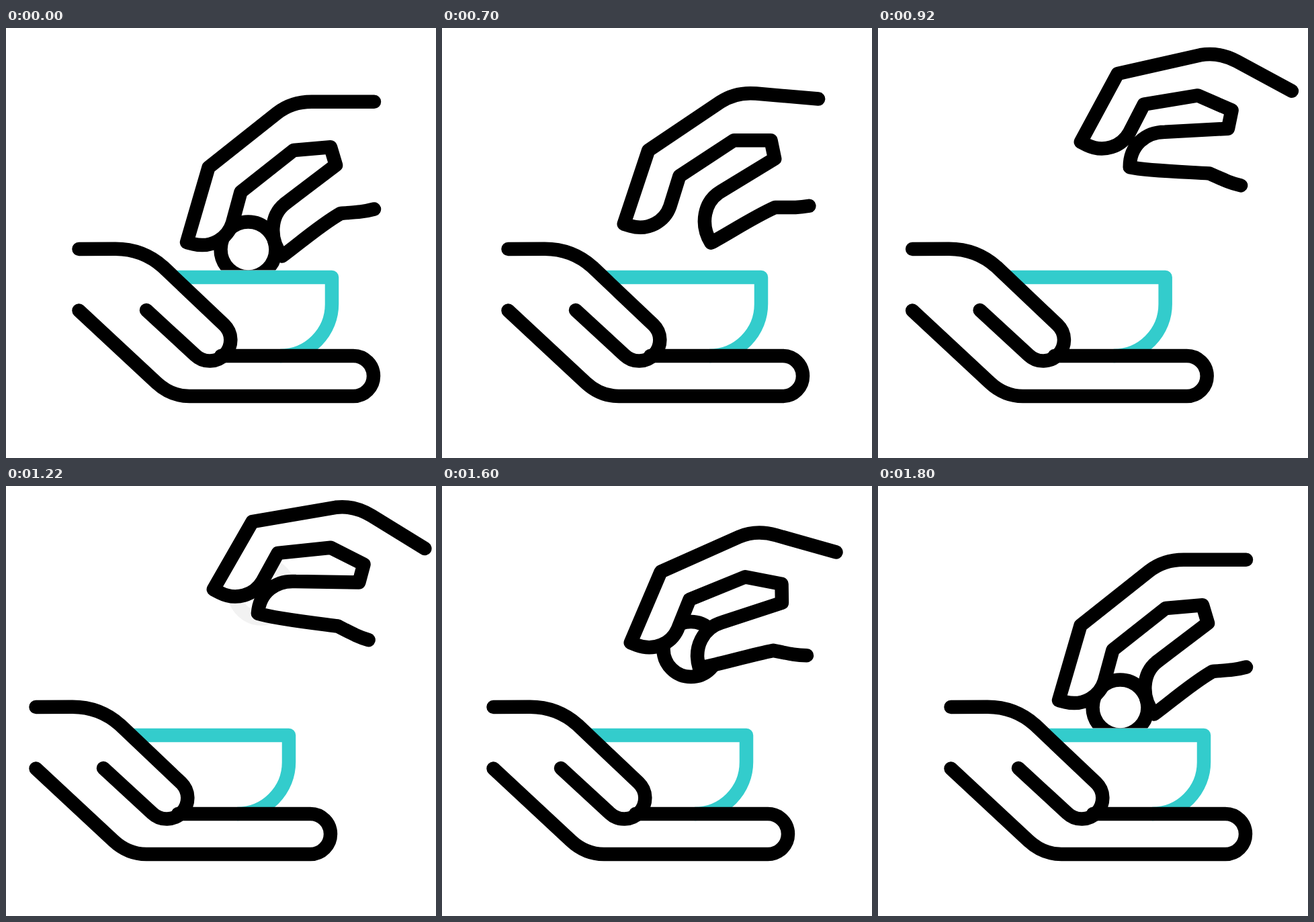
These frames come from a looping animation (640 by 640 pixels, 2020 ms). An HTML page:

```html
<!DOCTYPE html>
<html lang="en">
<head>
<meta charset="utf-8">
<title>Giving hands</title>
<style>
  html, body { margin: 0; width: 100%; height: 100%; overflow: hidden; background: #fff; }
  svg { display: block; width: 100%; height: 100%; }
  .line { fill: none; stroke: #000; stroke-width: 20.5; stroke-linecap: round; stroke-linejoin: round; }
  #bowl { stroke: #3cc; stroke-linecap: butt; }
  #giver { fill: #fff; }
</style>
</head>
<body>
<svg viewBox="0 0 640 640">
  <clipPath id="aboveBowl"><rect width="640" height="360.5"/></clipPath>
  <g clip-path="url(#aboveBowl)">
    <circle id="coin" class="line" cx="360.5" cy="329.5" r="41"/>
  </g>
  <path id="giver" class="line"/>
  <g id="receiver">
    <path id="bowl" class="line" d="M250 371H485V411A77 77 0 0 1 408 488"/>
    <path class="line" d="M108.5 420.5L224 528C238 541 254 548 273 548H517A30 30 0 0 0 517 488H320"/>
    <path class="line" d="M108.5 329L163 328.7C190 328.7 214 338 233.5 355.3L324.6 441.8A30 30 0 0 1 281.7 487L209 420"/>
  </g>
</svg>
<script>
const LOOP = 2020, STEP = 20;
const byId = id => document.getElementById(id);
const coin = byId('coin'), giver = byId('giver'), receiver = byId('receiver');

const clamp = v => Math.min(1, Math.max(0, v));
const ramp = (t, start, length = 400) => clamp((t - start) / length);
const ease = v => v * v * (3 - 2 * v);

// Moves a point along the chord of its turn around a pivot.
function bend(x, y, pivotX, pivotY, degrees, amount) {
  const angle = degrees * Math.PI / 180;
  const dx = x - pivotX, dy = y - pivotY;
  const turnedX = dx * Math.cos(angle) - dy * Math.sin(angle);
  const turnedY = dx * Math.sin(angle) + dy * Math.cos(angle);
  return `${x + (turnedX - dx) * amount} ${y + (turnedY - dy) * amount} `;
}

// The wrist and palm are rigid; the finger straightens and the thumb closes.
function handPath(lift) {
  const finger = (x, y) => bend(x, y, 313.5, 187, -18, lift);
  const thumb = (x, y, degrees) => bend(x, y, 491, 204, degrees, lift);
  return 'M548 109.7H455C436 109.7 418 115 403 127' +
    'L' + finger(301.5, 207.5) + finger(269, 319) + finger(279, 321.5) +
    'C' + finger(306, 328) + finger(330, 313) + finger(337, 290) +
    'L' + finger(349.5, 244) + '428 182L483 177.3L491 204' +
    'L' + thumb(416, 261, 6.5) +
    'C' + thumb(393, 278.5, 7.2) + thumb(391, 314, 10.8) + thumb(411, 339.5, 10.8) +
    'C' + thumb(430, 326, 8.5) + thumb(468, 293, 3) + '498 276' +
    'C525 274 533 273.5 548 269.5';
}

function draw(t) {
  const lift = ease(ramp(t, 600)) - ease(ramp(t, 1400));

  receiver.setAttribute('transform', `translate(${-64 * lift} 0)`);
  giver.setAttribute('d', handPath(lift));
  giver.setAttribute('transform',
    `translate(${33.5 * lift} ${-28.5 * lift}) rotate(${31.6 * lift} 548 189.5)`);

  // The coin drops into the bowl, then a new one fades in between the fingers.
  const refilled = t >= 1200;
  const x = refilled ? 20 * lift : 0;
  const y = refilled ? -173 * lift : 151 * ease(ramp(t, 200, 600));
  coin.setAttribute('transform', `translate(${x} ${y})`);
  coin.setAttribute('opacity', refilled ? ramp(t, 1200) : 1);
}

const origin = performance.now();
function tick() {
  const t = (performance.now() - origin) % LOOP;
  draw(Math.floor(t / STEP) * STEP);
  requestAnimationFrame(tick);
}
draw(0);
requestAnimationFrame(tick);
</script>
</body>
</html>
```
